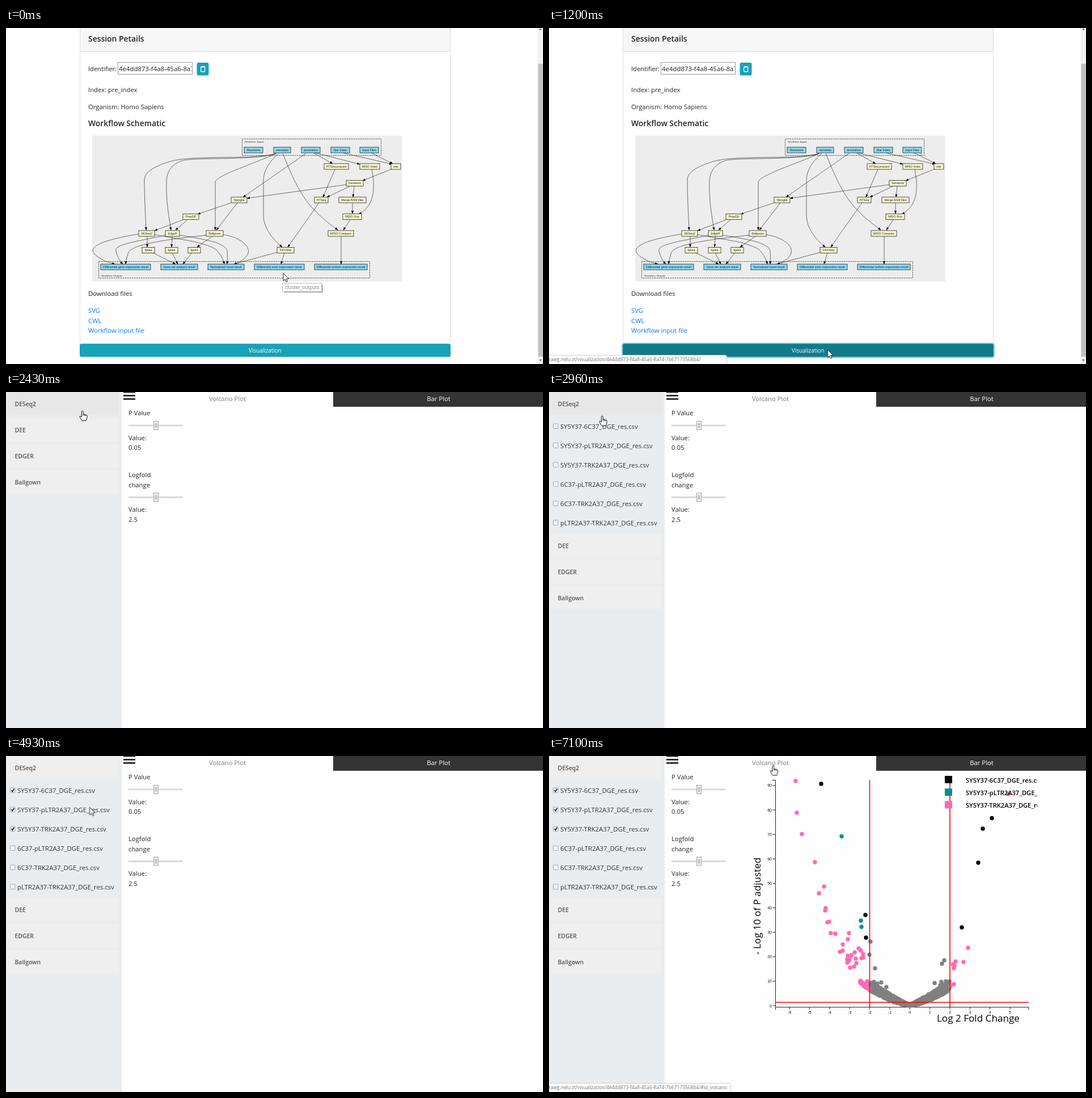
An HTML page for the animation above (8000 ms loop, 947 px wide and 592 px high).

```html
<!DOCTYPE html>
<html lang="en">
<head>
<meta charset="utf-8">
<title>Session workflow and volcano plot</title>
<style>
html, body { margin: 0; width: 100%; height: 100%; overflow: hidden; background: #fff; }
svg { display: block; font: 11.3px "Open Sans", "Noto Sans", sans-serif; fill: #212529; }
.head { font-size: 13.9px; font-weight: 600; }
.link { fill: #007bff; }
.mid { text-anchor: middle; }
.tiny { font: 5.3px "Liberation Sans", Arial, sans-serif; fill: #222; text-anchor: middle; }
.serif { font: 5px "Liberation Serif", Times, serif; fill: #222; }
.edge { fill: none; stroke: #222; stroke-width: .65; marker-end: url(#tip); }
.small { font-size: 8.4px; fill: #777; }
.panel { font-size: 10.4px; font-weight: 600; fill: #555; }
.tick { font: 7px "Liberation Sans", Arial, sans-serif; fill: #111; }
.title { font-size: 17.1px; fill: #000; }
.key { font-size: 11.1px; font-weight: 600; fill: #000; }
.line { fill: none; stroke: #222; stroke-width: 1; }
.limit { fill: none; stroke: #f00; stroke-width: 1.6; }
.dots { fill: none; stroke-width: 7.4; stroke-linecap: round; }
.mark { fill: none; stroke: #222; stroke-width: 1.7; }
</style>
</head>
<body>
<svg width="947" height="592" viewBox="0 0 947 592">
  <defs>
    <marker id="tip" markerUnits="userSpaceOnUse" markerWidth="6" markerHeight="5" refX="5" refY="2.1" orient="auto">
      <path d="M0 0L5.5 2.1 0 4.2Z" fill="#000"/>
    </marker>
    <clipPath id="field"><path d="M198 61h129.5v20h-129.5z"/></clipPath>
    <clipPath id="plotBox"><path d="M355 30h506v445h-506z"/></clipPath>
  </defs>

  <g id="session">
    <rect width="947" height="592" fill="#fff"/>
    <path d="M130 0h654v41h-654z" fill="#f6f6f6"/>
    <path d="M130.5 0V556M783.5 0V556M130 41.5H784" stroke="#dfdfdf" fill="none"/>
    <text class="head" x="145" y="23.5">Session Petails</text>
    <text x="145" y="75.5" style="font-size:11.1px">Identifier:</text>
    <rect x="197.5" y="60.5" width="131" height="21" fill="#fff" stroke="#999"/>
    <text x="199" y="75.5" clip-path="url(#field)" style="font-size:11.45px">4e4dd873-f4a8-45a6-8a74</text>
    <rect x="336.500" y="61" width="21" height="22.5" rx="3" fill="#17a2b8"/>
    <rect x="343.7" y="68.2" width="7" height="8.8" rx="1" fill="none" stroke="#fff" stroke-width="1.3"/>
    <path d="M345 67h4.4v2.6H345z" fill="#fff"/>
    <text x="145" y="112.5">Index: pre_index</text>
    <text x="145" y="142.5">Organism: Homo Sapiens</text>
    <text class="head" x="145" y="173">Workflow Schematic</text>
    <g id="graph">
      <path d="M152 189.500h546.500v257h-546.500z" fill="#ededed"/>
      <path d="M416.500 195.500h245v29h-245zM163.500 411.500h478v29h-478z" fill="none" stroke="#222" stroke-width=".7" stroke-dasharray="2.800 1.200"/>
      <text class="serif" x="421" y="202">Workflow Inputs</text>
      <text class="serif" x="168" y="437.500">Workflow Outputs</text>
    </g>
    <text x="145" y="472">Download files</text>
    <text class="link" x="145" y="501.5">SVG</text>
    <text class="link" x="145" y="519.5">CWL</text>
    <text class="link" x="145" y="537">Workflow input file</text>
    <rect id="ring" x="128" y="554.500" width="658" height="27" rx="5" fill="#8bd0db"/>
    <rect x="130" y="556.300" width="654" height="23.200" rx="3" fill="#17a2b8"/>
    <rect id="hover" x="130" y="556.300" width="654" height="23.200" rx="3" fill="#138496"/>
    <rect id="press" x="130.500" y="556.800" width="653" height="22.200" rx="2" fill="#117a8b"/>
    <text class="mid" x="457" y="572" fill="#fff" style="font-size:9.9px">Visualization</text>
    <path d="M937.500 0h9.500v592h-9.500z" fill="#f1f1f1"/>
    <path d="M938.500 63h8.500v516h-8.500z" fill="#c1c1c1"/>
    <path d="M940 3.500l2.500-3 2.500 3zM940 584l2.500 3 2.500-3z" fill="#666"/>
    <g id="hint">
      <path d="M490 452h69v14.500h-69z" fill="#bbb"/>
      <rect x="487.500" y="449.500" width="69" height="14.500" fill="#fff" stroke="#bbb"/>
      <text class="small" x="492" y="460">cluster_outputs</text>
    </g>
  </g>

  <g id="visual">
    <rect width="947" height="592" fill="#fefefe"/>
    <path d="M0 0h204v592H0z" fill="#e9edf0"/>
    <g id="files"></g>
    <g id="rest"><path d="M0 42h204v560H0z" fill="#e9edf0"/></g>
    <path d="M2 0h197v41H2z" fill="#efefef"/>
    <path id="over" d="M2 0h197v41H2z" fill="#e7e7e7"/>
    <text class="panel" x="15.500" y="25">DESeq2</text>
    <path d="M207 0h21v1.500h-21zM207 5h21v2.800h-21zM207 11h21v2.800h-21z" fill="#222"/>
    <text class="mid" x="390.500" y="15.500" fill="#7d7d7d">Volcano Plot</text>
    <path d="M577 0h370v26H577z" fill="#343434"/>
    <text class="mid" x="763" y="15.500" fill="#fff">Bar Plot</text>
    <g id="sliders"></g>
    <g id="plot" clip-path="url(#plotBox)"></g>
  </g>

  <g id="status">
    <path d="M-1 592V576.500H310.500Q313.500 576.500 313.500 579.500V592" fill="#fdfdfd" stroke="#cfcfcf"/>
    <path id="wide" d="M-1 592V576.500H317.500Q320.500 576.500 320.500 579.500V592" fill="#fdfdfd" stroke="#cfcfcf"/>
    <text class="small" x="-.5" y="587">rawg.nelu.zt/visualization/4e4dd873-f4a8-45a6-8a74-7b67173568b4/<tspan id="cut">#id_volc...</tspan></text>
    <text class="small" x="-.5" y="587"><tspan fill="none">rawg.nelu.zt/visualization/4e4dd873-f4a8-45a6-8a74-7b67173568b4/</tspan><tspan id="full">#id_volcano</tspan></text>
  </g>

  <g id="cursor">
    <circle id="click" cx="-.5" cy="1" r="8.300" fill="#ffe900" fill-opacity=".75"/>
    <path id="arrow" d="M0 0V13.500L3.200 10.600 5.300 15.200 7.400 14.300 5.400 9.800H9.500Z" fill="#fff" stroke="#111" stroke-width=".9"/>
    <path id="hand" d="M-1.600 1Q-.2-.8 1.200 1V6.200L6.200 7.200Q8 7.600 8 9.500V12L6.300 17.500H-1L-4.800 11.200Q-5.600 9.400-4 9.300L-1.600 11ZM1.200 6.200V9M3.600 6.800V9.300M5.900 7.300V9.500" fill="#fff" stroke="#111"/>
    <path id="beam" d="M-2.500-5.500H-.8L0-4.800.8-5.500H2.500M-2.500 5.500H-.8L0 4.800.8 5.500H2.500M0-4.800V4.800" fill="none" stroke="#111"/>
  </g>
</svg>
<script>
const LOOP = 8000;
const $ = id => document.getElementById(id);
const add = (id, markup) => $(id).insertAdjacentHTML('beforeend', markup);
const label = (x, y, s, attrs = '') => `<text x="${x}" y="${y}" ${attrs}>${s}</text>`;
const path = (d, cls) => `<path class="${cls}" d="${d}"/>`;

// Workflow graph
[
  'M476 221C440 233 330 223 290 235C265 243 244 252 244 268C244 300 246 330 247 356',
  'M476 221C445 234 330 227 310 234C290 241 283 255 283 272C282 305 287 330 291 356',
  'M477 221C435 240 369 260 369 272V356',
  'M481 221C465 235 454 250 454 270V330C454 352 470 372 487 386',
  'M488 221C500 250 515 290 540 317C560 338 575 348 585 356',
  'M645 249C650 275 650 295 640 312C634 320 628 325 622 328',
  'M234 363C180 372 130 385 165 405C172 410 180 413 192 416',
  'M262 364C300 372 345 375 370 390C380 400 383 408 385 416',
  'M281 365C240 375 190 380 194 393C196 402 200 410 206 416',
  'M306 365C350 372 385 378 390 392Q391 405 390 416',
  'M353 365C290 372 225 380 216 395Q212 405 211 416',
  'M383 364C420 370 435 390 424 402C418 410 410 413 402 416',
  ...('529 221L418 298,542 220L576 239,545 220L624 240,594 220L681 240,644 220L682 239,' +
    '580 249L559 298,679 249L629 269,600 276L425 300,606 279L566 298,614 279L612 298,' +
    '611 308V327,607 338L595 356,591 367V416,552 308L497 386,397 308L338 328,' +
    '408 308L371 356,312 338L262 357,320 338L299 356,249 367V386,293 367L292 386,' +
    '364 367L337 386,259 396L299 416,293 396L303 416,328 396L312 416,' +
    '479 395L402 416,491 396L485 416').split(',').map(s => 'M' + s)
].forEach(d => add('graph', path(d, 'edge')));

const rows = {
  215: 'Reactome 420 453|metadata 472 502|annotation 521 554|Star Index 573 606|Input Files 624 657',
  244: 'HTSeq prepare 561 604|MISO Index 624 659|star 679 696',
  273.5: 'Samtools 600 630',
  303: 'Stringtie 397 425|HTSeq 544 568|Merge BAM files 587 635',
  332.5: 'PrepDE 312 340|MISO Run 594 627',
  362: 'DESeq2 234 262|EdgeR 281 306|Ballgown 353 383|MISO Compare 568 613',
  391.5: 'fgsea 240 262|fgsea 281 303|fgsea 321 343|DEXSeq 478 508',
  421: 'Differential gene expression result 167 255|Gene set analysis result 273 338|' +
    'Normalised count result 356 420|Differential exon expression result 438 526|' +
    'Differential isoform expression result 544 637'
};
for (const [key, row] of Object.entries(rows)) {
  const y = +key, fill = y === 215 || y === 421 ? '#8bd8f0' : '#fafad2';
  for (const item of row.split('|')) {
    const [, name, a, b] = item.match(/(.+) (\d+) (\d+)$/);
    add('graph', `<rect x="${a}" y="${y - 5}" width="${b - a}" height="10" fill="${fill}" stroke="#222" stroke-width=".8"/>` +
      label((+a + +b) / 2, y + 1.8, name, 'class="tiny"'));
  }
}

// Sidebar and sliders
['SY5Y37-6C37', 'SY5Y37-pLTR2A37', 'SY5Y37-TRK2A37', '6C37-pLTR2A37', '6C37-TRK2A37', 'pLTR2A37-TRK2A37'].forEach((name, i) => {
  const y = 65 + 34 * i;
  add('files', `<rect x="7.500" y="${y - 9}" width="8.500" height="8.500" rx="1" fill="#f5f5f5" stroke="#a5a5a5"/>` +
    `<path id="check${i}" class="mark" opacity="0" d="M9.300 ${y - 4.800}l2 2.300 3.300-4.800"/>` +
    label(20, y, name + '_DGE_res.csv', 'fill="#333"'));
});
['DEE', 'EDGER', 'Ballgown'].forEach((name, i) => {
  const y = 46 + 46 * i;
  add('rest', `<path d="M2 ${y}h197v41H2z" fill="#efefef"/>` + label(15.5, y + 25, name, 'class="panel"'));
});
const slider = y => `<path d="M216 ${y - 1.5}h95.500v3h-95.500z" fill="#dedad7"/>
  <rect x="260.500" y="${y - 7.5}" width="8" height="15" fill="#efedeb" stroke="#aaa5a0"/>
  <path d="M262.500 ${y - 2.5}h4m-4 2.500h4m-4 2.500h4" stroke="#888"/>`;
add('sliders', slider(59) + slider(185.5) +
  [['P Value', 41], ['Value:', 84.5], ['0.05', 102], ['Logfold', 149.5], ['change', 167.5], ['Value:', 211], ['2.5', 229]]
    .map(([s, y]) => label(216, y, s)).join(''));

// Volcano plot
let seed = 11;
const rand = () => (seed = seed * 16807 % 2147483647) / 2147483647;
const dots = (color, d) => `<path class="dots" stroke="${color}" d="${d}"/>`;
const points = s => s.split(' ').map(p => `M${p}h.01`).join('');
const scatter = (n, place) => Array.from({ length: n }, () => {
  const [x, y] = place();
  return `M${x.toFixed(1)} ${y.toFixed(1)}h.01`;
}).join('');

const cloud = scatter(1100, () => {
  const u = 2 * rand() - 1, d = Math.abs(u);
  const low = 440 - 27 * d ** 1.6, high = 438 - 41 * d ** 1.1;
  return [636 + 70 * u, low + (high - low) * rand()];
});
const shoulder = scatter(28, () => {
  const x = 548 + 17 * rand();
  return [x, 397 + (x - 548) * .8 + (rand() - .5) * 5];
});
let axes = 'M393.500 42.500H399.500V442M399.500 442.500H846V447M399.500 442.500V447', ticks = '';
for (let v = 0; v <= 90; v += 10) {
  const y = 440 - v * 4.312;
  axes += `M394.500 ${y}h5`;
  ticks += label(393, y + 2.5, v, 'class="tick" text-anchor="end"');
}
for (let v = -6; v <= 5; v++) {
  const x = 636.3 + v * 35.35;
  axes += `M${x} 442.500v4`;
  ticks += label(x, 453.5, v, 'class="tick mid"');
}
const legend = [['#000', '6C37'], ['#009090', 'pLTR2A37'], ['#ff69b4', 'TRK2A37']].map(([color, name], i) =>
  `<rect x="698" y="${35 + 22.2 * i}" width="13" height="13" fill="${color}"/>` +
  label(735, 46.5 + 22.2 * i, `SY5Y37-${name}_DGE_res.csv`, 'class="key"')).join('');
add('plot', path(axes, 'line') + ticks +
  dots('#808080', cloud + points('567,327 565,350 575,374 697,360 693,366 680,400 690,404 692,398 700,397 586,399 573,398 579,401 595,407')) +
  dots('#ff69b4', shoulder + points('435,44 437,100 446,137.5 469,187 485,230 476,242 488,268 487,272 491,293 494,292 497,312 505,313 ' +
    '529,312 527,323 518,332 513,345 518,343 539,346 546,339 550,343 554,349 551,356 554,355 533,351 527,352 526,358 530,358 ' +
    '526,364 529,361 541,357 542,365 531,373 538,371 561,397 739,338 717,362 731,363 712,367 715,369 714,374 714,402 708,405 810,67')) +
  dots('#009090', points('516,141.5 550,290 551,301')) +
  dots('#000', points('480,49 558,280 559,320 781,109.5 765,128 757,188 728,302')) +
  path('M565.500 42V442M707 42V442M399.500 434H846', 'limit') + legend +
  label(684, 468, 'Log 2 Fold Change', 'class="title"') +
  label(0, 0, '- Log 10 of P adjusted', 'class="title" transform="translate(372.500 350) rotate(-90)"'));

// Timeline: each stop is [ms, value, easing to the next stop]
const sheet = document.createElement('style');
function track(id, prop, stops) {
  const all = [...stops, [LOOP, stops[stops.length - 1][1]]];
  const frames = all.map(([t, v, ease = 'step-end']) =>
    `${t / LOOP * 100}%{${prop}:${v};animation-timing-function:${ease}}`).join('');
  sheet.textContent += `@keyframes k-${id}{${frames}}#${id}{animation:k-${id} ${LOOP}ms infinite}\n`;
}
// Visible only inside the given [from, to] spans
const show = (id, ...spans) => track(id, 'opacity', [
  ...(spans[0][0] ? [[0, 0]] : []),
  ...spans.flatMap(([a, b = LOOP]) => b < LOOP ? [[a, 1], [b, 0]] : [[a, 1]])
]);
const at = (x, y) => `translate(${x}px,${y}px)`;
const hops = n => `steps(${n},start)`;

show('hint', [0, 210]);
show('hover', [645, 980]);
show('ring', [980]);
show('press', [980]);
show('visual', [1320]);
show('over', [2310, 3060]);
track('rest', 'transform', [[0, at(0, 0)], [2540, at(0, 0), hops(3)], [2860, at(0, 204)]]);
show('check0', [3280]);
show('check1', [4070]);
show('check2', [4390]);
track('status', 'opacity', [[0, 0], [755, 1], [1430, .3], [1545, 0], [5905, .3], [6020, 1]]);
show('wide', [6885]);
track('cut', 'fill', [[0, 'transparent'], [5500, '#777'], [6885, 'transparent']]);
track('full', 'fill', [[0, 'transparent'], [6885, '#777']]);
show('plot', [7095]);
show('click', [980, 1090], [2540, 2750], [3280, 3495], [4070, 4280], [4390, 4600], [5905, 6130]);
show('arrow', [0, 2310], [3060, 3610], [4070, 5690]);
show('hand', [2310, 3060], [5690]);
show('beam', [3610, 4070]);
track('cursor', 'transform', [
  [0, at(489, 432)],
  [100, at(489, 432), hops(6)],
  [755, at(491.5, 567)],
  [1320, at(486, 545)],
  [1430, at(479, 522)],
  [1545, at(479, 522), hops(3)],
  [1860, at(317, 345)],
  [2095, at(317, 345), hops(3)],
  [2420, at(135, 33)],
  [2955, at(135, 33), hops(3)],
  [3275, at(12, 60)],
  [3500, at(12, 60), hops(3)],
  [3835, at(19, 90)],
  [3945, at(19, 102.5)],
  [4070, at(12, 93)],
  [4280, at(12, 110)],
  [4390, at(11, 126)],
  [4705, at(11, 126), hops(8)],
  [5580, at(375, 31), hops(2)],
  [5800, at(400, 12.5)],
  [6455, at(397.5, 13)],
  [6885, at(395.5, 16.5)]
]);
document.head.append(sheet);
</script>
</body>
</html>
```
